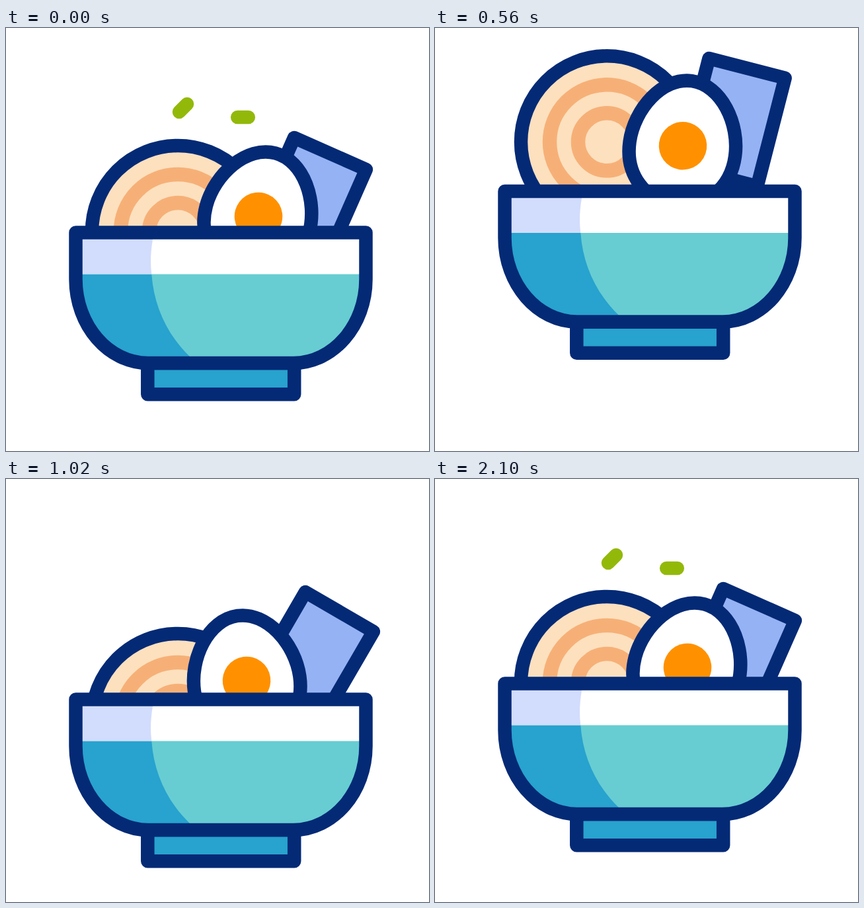
Animation of 640x640 px, one loop 2200 ms. Source, as an HTML page:

```html
<!DOCTYPE html>
<html lang="en">
<head>
<meta charset="utf-8">
<title>Noodle bowl</title>
<style>
  html, body { margin: 0; width: 100%; height: 100%; overflow: hidden; background: #fff; }
  svg { display: block; width: 100vw; height: 100vh; }
  .line { stroke: #042a76; stroke-width: 20.5; stroke-linejoin: round; }
  .herb { stroke: #92b90a; stroke-width: 20.5; stroke-linecap: round; }
</style>
</head>
<body>
<svg viewBox="0 0 640 640">
  <defs>
    <clipPath id="above"><rect id="mask" y="-640" width="640" height="1000"/></clipPath>
    <clipPath id="inside"><path d="M105.5 309.5H544.5V380C544.5 450 495 507 435 507H215C155 507 105.5 450 105.5 380Z"/></clipPath>
  </defs>

  <g clip-path="url(#above)">
    <path id="herbL" class="herb" d="M-6 6L6 -6"/>
    <path id="herbR" class="herb" d="M-8.3 0H8.3"/>
    <rect id="nori" class="line" width="119" height="169" fill="#95b2f4"/>
    <g id="noodles" fill="none" stroke="#f6b077" stroke-width="21.5">
      <circle class="line" r="130" fill="#fde0be"/>
      <circle r="86.5"/>
      <circle r="43.5"/>
    </g>
    <g id="egg">
      <path class="line" fill="#fff" d="M0 -99C45 -99 80.5 -45 80.5 5C80.5 55 45 90 0 90S-80.5 55 -80.5 5C-80.5 -45 -45 -99 0 -99Z"/>
      <circle r="36.3" fill="#ff9100"/>
    </g>
  </g>

  <g id="bowl">
    <rect class="line" x="214.3" y="507" width="221.9" height="47.3" fill="#28a2ce"/>
    <g clip-path="url(#inside)">
      <path fill="#fff" d="M95 300H555V373H95Z"/>
      <path fill="#67cdd2" d="M95 372.5H555V517H95Z"/>
      <path fill="#28a2ce" d="M95 372.5H220.3C224 422 244 464 278 497V517H95Z"/>
      <path fill="#d2dcfd" d="M95 300H226L222 320C219 338 218 355 220.3 372.5H95Z"/>
    </g>
    <path class="line" fill="none" d="M105.5 309.5H544.5V380C544.5 450 495 507 435 507H215C155 507 105.5 450 105.5 380Z"/>
  </g>
</svg>

<script>
const LOOP = 2200, END = 2100, STEP = 20;

// Each row: time, x, y, angle
const tracks = {
  bowl: [
    [0, 0, 0], [400, 0, -124], [740, 0, 32], [855, 0, 51], [1020, 0, 24],
    [1080, 0, 6.5], [1340, 0, -50], [1640, 0, .4], [1700, 0, 0], [END, 0, 0]
  ],
  noodles: [
    [0, 260, 308], [400, 260, 210], [540, 260, 176], [690, 260, 155], [740, 260, 158],
    [1020, 260, 364], [1120, 260, 390], [1340, 260, 337], [1640, 260, 309.5], [END, 260, 308]
  ],
  egg: [
    [0, 382, 285, 15], [400, 391, 240, 28], [720, 359, 130, -12], [740, 359, 131, -12],
    [1020, 364, 305, -8], [1180, 374, 352, 1], [1340, 385, 339, 10], [1640, 382, 285, 15], [END, 382, 285, 15]
  ],
  nori: [
    [0, 436, 166, 23.8], [400, 392, 55, 8.7], [550, 413, 46, 14], [740, 440, 58, 24.5],
    [985, 454, 157, 31], [1020, 453, 171, 30.2], [1150, 445, 190, 27.5],
    [1340, 436, 171, 23.8], [1640, 436, 166, 23.8], [END, 436, 166, 23.8]
  ],
  herbL: [
    [0, 268, 121], [150, 272, 155], [400, 279, 330], [700, 255, 450], [900, 236, 420], [1060, 231, 310],
    [1180, 235, 185], [1340, 241, 110], [1450, 245, 88], [1620, 252, 92], [1700, 255, 101.5],
    [1880, 261.5, 115], [END, 268, 121]
  ],
  herbR: [
    [0, 358.5, 135], [150, 354, 168], [400, 347, 330], [700, 370, 450], [900, 388, 420], [1060, 389, 300],
    [1180, 385, 170], [1340, 380, 88], [1450, 376, 63], [1620, 371, 81], [1700, 368.5, 99],
    [1880, 363.5, 124], [END, 358.5, 135]
  ]
};

const byId = id => document.getElementById(id);
const slope = (a, b, c) => (b[c] - a[c]) / (b[0] - a[0]);

// Tangent that never overshoots a key
function tangent(keys, i, c) {
  if (i === 0 || i === keys.length - 1) return 0;
  const p = slope(keys[i - 1], keys[i], c), q = slope(keys[i], keys[i + 1], c);
  return p * q > 0 ? 2 * p * q / (p + q) : 0;
}

function valueAt(keys, t, c) {
  let i = 0;
  while (i < keys.length - 2 && t >= keys[i + 1][0]) i++;
  const a = keys[i], b = keys[i + 1], h = b[0] - a[0], u = (t - a[0]) / h, v = 1 - u;
  return v * v * (1 + 2 * u) * a[c] + u * u * (3 - 2 * u) * b[c]
    + h * u * v * (v * tangent(keys, i, c) - u * tangent(keys, i + 1, c));
}

function draw(t) {
  for (const [id, keys] of Object.entries(tracks)) {
    const [x, y, turn] = [1, 2, 3].map(c => c < keys[0].length ? valueAt(keys, t, c) : 0);
    byId(id).setAttribute("transform", `translate(${x} ${y}) rotate(${turn})`);
    if (id === "bowl") byId("mask").setAttribute("transform", `translate(0 ${y})`);
  }
}

const start = performance.now();
function frame() {
  const t = (performance.now() - start) % LOOP;
  draw(Math.min(END, Math.floor(t / STEP) * STEP));
  requestAnimationFrame(frame);
}
frame();
</script>
</body>
</html>
```
